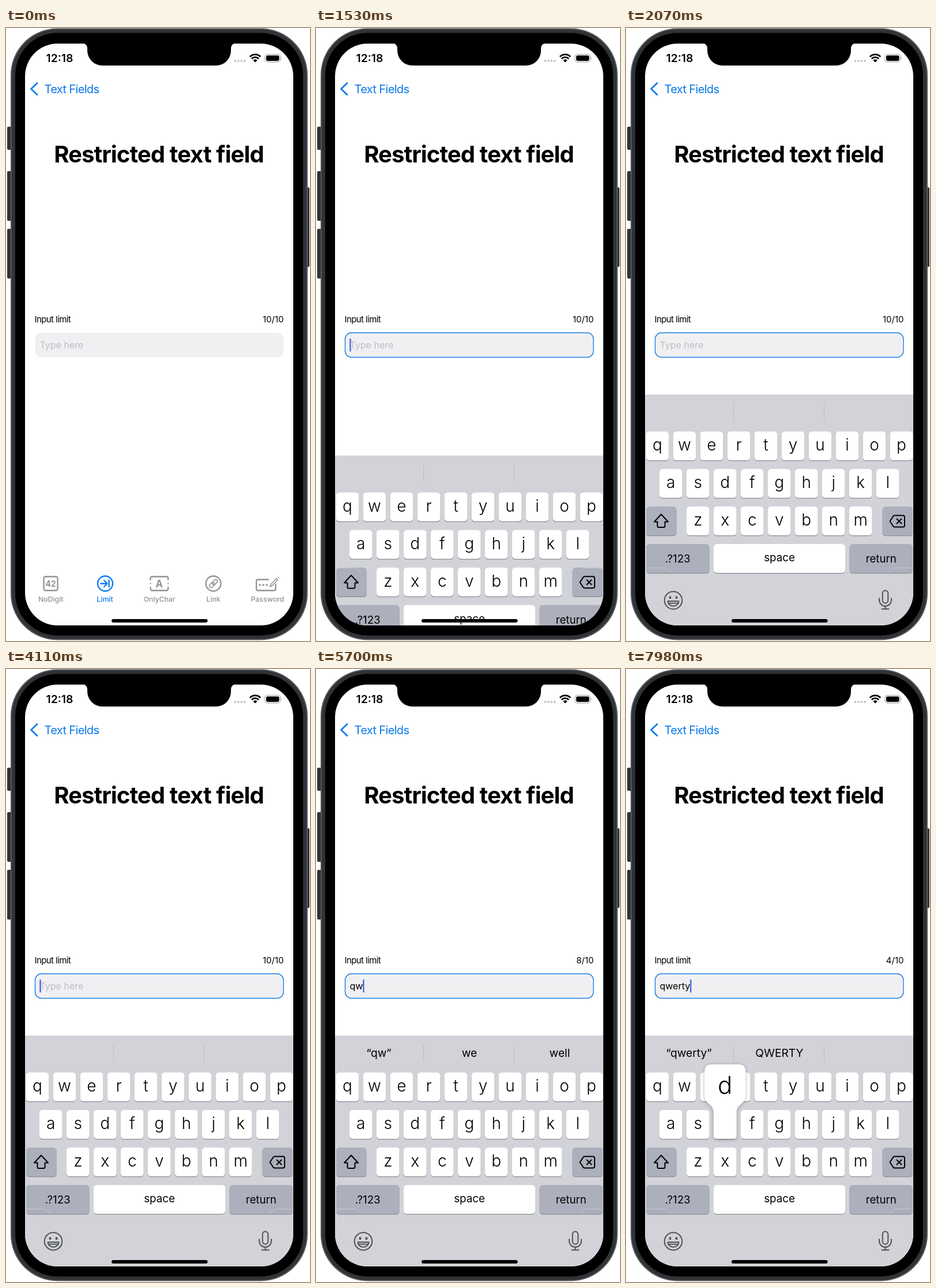
These frames come from a looping animation (527x1062 px, 8 s). An HTML page:

```html
<!DOCTYPE html>
<html lang="en">
<head>
<meta charset="utf-8">
<style>
  html, body { margin: 0; width: 100%; height: 100%; overflow: hidden; background: #fff; }
  svg { display: block; width: 527px; height: 1062px; font-family: Inter, sans-serif; }
  .mid { text-anchor: middle; }
  .line { fill: none; stroke-width: 2.3; stroke-linecap: round; stroke-linejoin: round; }
  #tabs { font-size: 12.3px; font-weight: 500; fill: #929292; stroke: none; }
  #tabs .line { stroke: #929292; }
  #tabs .on { fill: #067af2; }
  #tabs .on .line { stroke: #067af2; }
  #tabs .thin { stroke-width: 1.6; }
  #keys { font-size: 28px; font-weight: 300; }
  .label { font-size: 18.7px; font-weight: 400; }
  .guess { font-size: 19.2px; }
  #popup path { fill: #fff; filter: drop-shadow(0 1px 3px rgba(0, 0, 0, .28)); }
  #popup text { font-size: 42px; font-weight: 300; }
</style>
</head>
<body>
<svg viewBox="0 0 527 1062">
  <clipPath id="screen"><rect x="33" y="27" width="465" height="1008" rx="56.5"/></clipPath>

  <!-- phone body -->
  <g fill="#303336">
    <rect x="2" y="171" width="10" height="40" rx="2"/>
    <rect x="2" y="248" width="10" height="86" rx="2"/>
    <rect x="2" y="348" width="10" height="86" rx="2"/>
    <rect x="516" y="276" width="10" height="138" rx="2"/>
  </g>
  <rect x="9" y="1.5" width="513" height="1058" rx="80" fill="#303235" stroke="#55585b" stroke-width="2"/>
  <rect x="16" y="8.5" width="499" height="1044" rx="73"/>
  <rect x="33" y="27" width="465" height="1008" rx="56.5" fill="#fff"/>
  <path d="M132 26a9 9 0 0 1 9 9v4a26 26 0 0 0 26 26h197a26 26 0 0 0 26-26v-4a9 9 0 0 1 9-9z"/>

  <!-- status bar -->
  <text x="69.5" y="59" font-size="19.3" font-weight="600">12:18</text>
  <g fill="#c6c6c9"><circle cx="397.3" cy="57" r="2"/><circle cx="402.8" cy="57" r="2"/><circle cx="408.3" cy="57" r="2"/><circle cx="413.8" cy="57" r="2"/></g>
  <path d="M432 59.5l-3.6-3.6a5 5 0 0 1 7.2 0z"/>
  <path d="M425.8 53.2a8.8 8.8 0 0 1 12.4 0M422.8 49.7a13 13 0 0 1 18.4 0" fill="none" stroke="#000" stroke-width="2.8"/>
  <rect x="449" y="45.5" width="26.5" height="13.3" rx="4" fill="none" stroke="#a5a5a8" stroke-width="1.2"/>
  <rect x="451" y="47.4" width="22.5" height="9.5" rx="2.4"/>
  <path d="M477 50q2 2 0 4.5z" fill="#a5a5a8"/>

  <!-- page -->
  <path class="line" d="M54 95.5L43.5 105.5L54 115.5" stroke="#0a7aea" style="stroke-width:2.7"/>
  <text x="66.5" y="113" font-size="20" letter-spacing="-.65" fill="#0a7aea">Text Fields</text>
  <text class="mid" x="265" y="233" font-size="40" font-weight="700" letter-spacing="-.9">Restricted text field</text>
  <text x="49.5" y="510" font-size="15" letter-spacing="-.58">Input limit</text>
  <text id="count" x="481.5" y="510" font-size="15" text-anchor="end"></text>
  <rect id="field" x="50.5" y="528" width="430.5" height="42.5" rx="11" fill="#f0f0f3" stroke-width="1.4"/>
  <text id="hint" x="58.5" y="555" font-size="16" fill="#bebec2">Type here</text>
  <text id="typed" x="58.5" y="555" font-size="16"></text>
  <rect id="caret" y="538" width="2.4" height="22.5" rx="1" fill="#4169dc"/>

  <!-- tab bar -->
  <g id="tabs" class="mid">
    <rect class="line" x="65.5" y="950.5" width="24" height="24" rx="3"/>
    <text x="77.5" y="967.7" font-size="14" font-weight="700">42</text>
    <text x="77.7" y="994">NoDigit</text>
    <g class="on">
      <circle class="line" cx="172" cy="962.5" r="13"/>
      <path class="line" d="M164 962.5h11M170 957l5.5 5.5l-5.5 5.5M178.5 956.5v12"/>
      <text x="171.5" y="994">Limit</text>
    </g>
    <path class="line" d="M250.5 956v-2.5q0-3 3-3h24.5q3 0 3 3v2.5M250.5 969v2.5q0 3 3 3h24.5q3 0 3-3v-2.5M250.5 962.5h.1M281 962.5h.1"/>
    <text x="265.7" y="968.7" font-size="17" font-weight="700">A</text>
    <text x="266" y="994">OnlyChar</text>
    <circle class="line" cx="359.5" cy="962.5" r="13"/>
    <g transform="translate(359.5 962.5) rotate(-45)">
      <rect class="line thin" x="-8.5" y="-3" width="10" height="6" rx="3"/>
      <rect class="line thin" x="-1.5" y="-3" width="10" height="6" rx="3"/>
    </g>
    <text x="359.5" y="994">Link</text>
    <path class="line" d="M455 955.5h-18q-3 0-3 3v13q0 3 3 3h27.5q3 0 3-3v-8"/>
    <path class="line thin" d="M457.5 968l1.5-4l10-10.5l2.2 2.2l-10 10.5zM472 951.500l1 1"/>
    <circle cx="440" cy="965" r="1.8"/><circle cx="446" cy="965" r="1.8"/><circle cx="452" cy="965" r="1.8"/>
    <text x="453.3" y="994">Password</text>
  </g>

  <!-- keyboard -->
  <g clip-path="url(#screen)">
    <g id="keyboard">
      <rect x="33" y="635" width="465" height="402" fill="#d2d3d9"/>
      <path d="M186.5 651v29M343.5 651v29" stroke="#bbbdc4"/>
      <text class="guess mid" x="109" y="672"></text>
      <text class="guess mid" x="266" y="672"></text>
      <text class="guess mid" x="422.5" y="672"></text>
      <g id="keys" class="mid"></g>
      <g class="line" stroke="#000" style="stroke-width:2">
        <path d="M61 842.5L73 855.5H67.5V863q0 2-2 2H56.5q-2 0-2-2V855.5H49z"/>
        <path d="M466 844.5h14q3 0 3 3v14q0 3-3 3h-14q-1.5 0-2.5-1l-6-9l6-9q1-1 2.5-1zM469.5 850.5l8 8M477.5 850.5l-8 8"/>
      </g>
      <g class="line" stroke="#505257" style="stroke-width:2">
        <circle cx="82" cy="991.5" r="15.3"/>
        <path d="M72.500 993h19a9.500 8.500 0 0 1-19 0zM74.500 996.500h15"/>
        <path d="M76.500 986v1M87.500 986v1" stroke-width="3.8"/>
        <rect x="444.7" y="974.5" width="9.6" height="22" rx="4.8"/>
        <path d="M439 988v3a10.5 10.5 0 0 0 21 0v-3M449.5 1001.5v5M443.5 1006.5h12"/>
      </g>
      <g id="popup"><path/><text class="mid" y="-28"></text></g>
    </g>
    <path d="M35 935.5H68L78 942.5M497 935.5H466L456 943.5" fill="none" stroke="#fff" opacity=".3"/>
  </g>
  <rect x="183" y="1024" width="166.5" height="6" rx="3"/>
</svg>
<script>
const $ = id => document.getElementById(id);
const clamp = v => Math.min(1, Math.max(0, v));
const LOOP = 8000, TAP = 1350, TYPING = 4890;
const BLUE = '#1a80e2', GREY = '#abb0bc';
const PITCH = 47, KEY_W = 39.5;

const presses = [
  ['q', 4890, 4980], ['w', 5130, 5220], ['e', 5790, 5910], ['r', 6360, 6480],
  ['t', 6750, 6860], ['y', 7250, 7370], ['d', 7950, 8000]
];
const guesses = [['', ''], ['quite', 'question'], ['we', 'well'], ['we', 'were'], ['QWERTY', ''], ['QWERTY', ''], ['QWERTY', '']];

// Keys
const keyAt = {};
const key = (x, y, w, label = '', fill = '#fff', cls = '', base = 33) =>
  `<rect x="${x}" y="${y + 1.3}" width="${w}" height="50" rx="5.5" fill="#8b8d93"/>
   <rect x="${x}" y="${y}" width="${w}" height="50" rx="5.5" fill="${fill}"/>
   <text class="${cls}" x="${x + w / 2}" y="${y + base}">${label}</text>`;
let markup = '';
[['qwertyuiop', 34.7], ['asdfghjkl', 58], ['zxcvbnm', 105]].forEach(([letters, left], row) => {
  [...letters].forEach((letter, i) => {
    const x = left + i * PITCH, y = 699 + row * 65;
    keyAt[letter] = { x: x + KEY_W / 2, y };
    markup += key(x, y, KEY_W, letter);
  });
});
markup += key(35, 829, 52.5, '', GREY) + key(444.5, 829, 52.5, '', GREY)
  + key(35, 894, 109.5, '.?123', GREY, 'label', 32)
  + key(152, 894, 228, 'space', '#fff', 'label', 30)
  + key(387.5, 894, 109.5, 'return', GREY, 'label', 32);
$('keys').innerHTML = markup;

const slots = [...document.querySelectorAll('.guess')];
const [bubble, bubbleText] = $('popup').children;

function showPopup(t) {
  const press = presses.find(([, down, up]) => t >= down && t < up);
  $('popup').style.display = press ? '' : 'none';
  if (!press) return;
  const { x, y } = keyAt[press[0]];
  const shift = Math.max(0, 70.5 - x), l = shift - 35.5, r = shift + 35.5;
  $('popup').setAttribute('transform', `translate(${x} ${y})`);
  bubble.setAttribute('d', `M${l} -67q0 -12 12 -12H${r - 12}q12 0 12 12V-25
    C${r} -9 19.8 -12 19.8 5V45q0 5 -5 5H-14.8q-5 0 -5 -5V5C-19.8 -12 ${l} -9 ${l} -25z`);
  bubbleText.textContent = press[0];
  bubbleText.setAttribute('x', shift);
}

// Suggested words arrive letter by letter, sliding in from the right
function showGuess(slot, word, age) {
  const slide = 16 * (1 - clamp(age / 400));
  slot.setAttribute('transform', `translate(${slide} 0)`);
  slot.innerHTML = [...word].map((c, i) => {
    const fade = clamp((age - i * 40) / 133);
    return `<tspan fill-opacity="${fade}" font-size="${19.2 - 4 * (1 - fade)}">${c}</tspan>`;
  }).join('');
}

function caretOpacity(t) {
  if (t < TAP + 30) return 0;
  if (t < 1885 || t >= TYPING) return 1;
  const p = (t - 1885) % 820;
  return p < 180 ? 1 - p / 180 : clamp((p - 260) / 110);
}

function draw(now) {
  const t = now % LOOP;
  const n = presses.filter(([, , up]) => t >= up).length;
  const text = presses.slice(0, n).map(p => p[0]).join('');

  const s = Math.max(0, t - TAP - 30) / 1000 * 17.37;
  $('keyboard').setAttribute('transform', `translate(0 ${402 * (1 + s) * Math.exp(-s)})`);

  $('field').setAttribute('stroke', t < TAP ? 'none' : BLUE);
  $('count').textContent = `${10 - n}/10`;
  $('hint').style.display = n ? 'none' : '';
  $('typed').textContent = text;
  $('caret').setAttribute('x', 58.3 + (n ? $('typed').getComputedTextLength() : 0));
  $('caret').setAttribute('opacity', caretOpacity(t));

  slots[0].textContent = n ? `“${text}”` : '';
  [0, 1].forEach(i => {
    let first = n;
    while (first > 1 && guesses[first - 1][i] === guesses[n][i]) first--;
    showGuess(slots[i + 1], guesses[n][i], n ? t - presses[first - 1][2] - 80 : 0);
  });
  showPopup(t);
  requestAnimationFrame(draw);
}
draw(performance.now());
</script>
</body>
</html>
```
